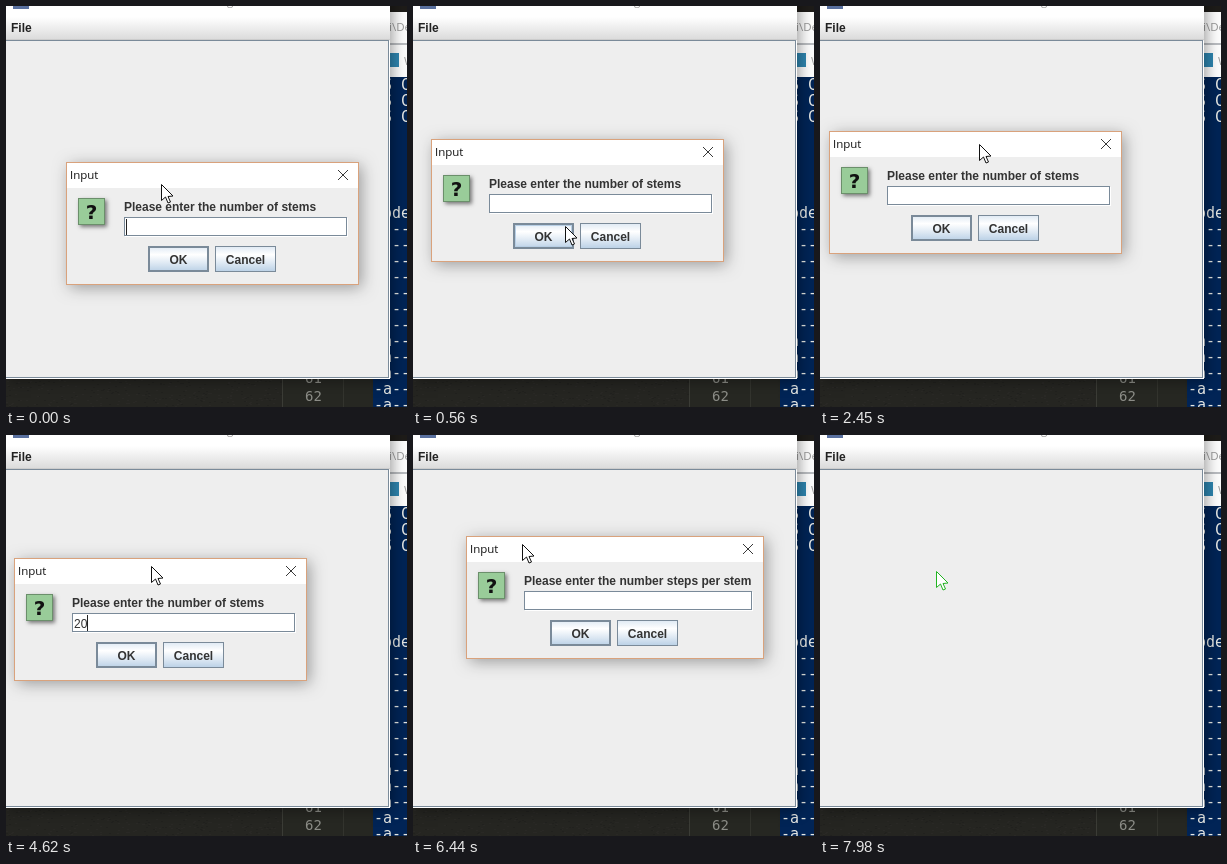
An HTML page with a canvas for the animation above (8 s loop, 401x401 px).

```html
<!DOCTYPE html>
<html lang="en">
<head>
<meta charset="utf-8">
<title>Input dialogs</title>
<style>
html, body { margin: 0; width: 100%; height: 100%; overflow: hidden; background: #eee; }
canvas { display: block; width: 401px; height: 401px; }
</style>
</head>
<body>
<canvas id="stage" width="401" height="401"></canvas>
<script>
const SIZE = 401, LOOP = 8000, STEP = 70, BLINK = 490;
const BOLD = 'bold 12px "Liberation Sans", Arial, sans-serif';
const PLAIN = '12px "Liberation Sans", Arial, sans-serif';
const UI = '11.5px "Open Sans", sans-serif';
const MONO = '15px "DejaVu Sans Mono", monospace';
const EDGE = '#7a8a99';
const screen = document.getElementById('stage').getContext('2d');
let ctx = screen;

const first = {
  opens: 0, closes: 4900, blinkFrom: 0, w: 293, label: 'Please enter the number of stems',
  place: t => glide(glide(glide({ x: 60, y: 156 }, t, 0, 350, 18, 133), t, 2100, 350, 9, 125), t, 2450, 70, 8, 123),
  keys: [[3150, '2'], [3500, '0'], [3990, '<'], [4130, '<'], [4550, '2'], [4620, '0']]
};
const second = {
  opens: 6300, closes: 7980, blinkFrom: 5810, w: 298, label: 'Please enter the number steps per stem',
  place: t => glide(glide({ x: 235, y: 222 }, t, 6300, 140, 53, 101), t, 6440, 70, 42, 91),
  keys: [[7560, '1'], [7770, '0']]
};

// Moves a point to (x, y) during ms from t0 on
function glide(from, t, t0, ms, x, y) {
  const p = Math.min(1, Math.max(0, (t - t0) / ms));
  return { x: Math.round(from.x + (x - from.x) * p), y: Math.round(from.y + (y - from.y) * p) };
}

function grip(d, t, dx, dy) {
  const { x, y } = d.place(t);
  return { x: x + dx, y: y + dy };
}

function pointerAt(t) {
  if (t <= 350) return grip(first, t, 95, 22);
  if (t >= 2100 && t <= 2660) return grip(first, t, 150, 13);
  if (t >= 6300 && t <= 6580) return grip(second, t, 56, 8);
  let p = grip(first, 350, 95, 22);
  const go = (...leg) => { p = glide(p, t, ...leg); };
  go(350, 210, 152, 220);   // to OK
  go(560, 280, 169, 200);   // into the field
  go(1050, 420, 178, 199);
  go(1680, 420, 168, 146);  // back to the title bar
  go(2660, 70, 145, 131);
  go(5250, 70, 145, 126);
  go(5460, 70, 335, 238);
  go(6510, 70, 98, 99);
  go(6580, 490, 124, 140);
  go(7140, 210, 116, 136);
  return p;
}

function fieldAt(d, t) {
  let value = '', since = d.blinkFrom;
  for (const [time, key] of d.keys) {
    if (time > t) break;
    value = key === '<' ? value.slice(0, -1) : value + key;
    since = time;
  }
  return { value, caret: Math.floor((t - since) / BLINK) % 2 === 0 };
}

function rect(x, y, w, h, fill) {
  ctx.fillStyle = fill;
  ctx.fillRect(x, y, w, h);
}

function frame(x, y, w, h, color, width = 1) {
  ctx.strokeStyle = color;
  ctx.lineWidth = width;
  ctx.strokeRect(x + width / 2, y + width / 2, w - width, h - width);
}

function text(s, x, y, font, color, align = 'left') {
  ctx.font = font;
  ctx.fillStyle = color;
  ctx.textAlign = align;
  ctx.fillText(s, x, y);
}

function shade(y, h, ...stops) {
  const g = ctx.createLinearGradient(0, y, 0, y + h);
  stops.forEach((c, i) => g.addColorStop(i / (stops.length - 1), c));
  return g;
}

function shadowed(x, y, w, h, fill, blur, alpha, shift) {
  ctx.save();
  ctx.shadowColor = `rgba(0,0,0,${alpha})`;
  ctx.shadowBlur = blur;
  ctx.shadowOffsetX = ctx.shadowOffsetY = shift;
  rect(x, y, w, h, fill);
  ctx.restore();
}

function wallpaper() {
  rect(0, 0, SIZE, SIZE, '#252521');
  let seed = 7;
  const rnd = n => Math.floor((seed = seed * 16807 % 2147483647) / 2147483647 * n);
  for (let i = 0; i < 300; i++) rect(rnd(276), 374 + rnd(27), 2, 1, rnd(2) ? '#292825' : '#21211e');
}

function editor() {
  rect(276, 366, 91, 35, '#262722');
  rect(276, 366, 1, 35, '#3b3c36');
  rect(337, 366, 1, 35, '#33342e');
  [61, 62].forEach((n, i) => text(n, 299, 377 + i * 18, '14px "DejaVu Sans Mono", monospace', '#8c8d87'));
}

function terminal() {
  rect(367, 0, 34, 6, '#1e1c19');
  rect(367, 6, 34, 65, '#fdfdfd');
  rect(367, 37, 34, 2, '#b9bcc0');
  text('i\\De', 383, 25, UI, '#999');
  rect(381, 47, 12, 14, '#2f86b0');
  text('W', 398, 59, UI, '#999');
  rect(367, 71, 34, 330, '#012456');
  for (let i = 0; i < 21; i++) {
    const line = i < 3 ? 'PS C' : i < 8 ? '' : i === 8 ? 'Mode' : i === 9 ? '----' : i < 16 ? 'd---' : '-a--';
    text(line, 368, 84 + i * 16, MONO, '#e6e8e4');
  }
}

function mainWindow() {
  shadowed(0, -20, 384, 393, '#eee', 14, 0.4, 2);
  rect(0, 0, 384, 11, '#fff');
  rect(7, 0, 16, 3, '#59709f');
  text('g', 221, -1, UI, '#999');
  rect(0, 11, 384, 23, shade(11, 23, '#fff', '#dadada'));
  rect(0, 33, 384, 1, '#ccc');
  frame(-1, 34, 384, 338, EDGE);
  rect(383, 35, 1, 338, '#fff');
  rect(0, 372, 384, 1, '#fff');
  text('File', 5, 26, BOLD, '#222');
}

function makeDesktop() {
  const c = document.createElement('canvas');
  c.width = c.height = SIZE;
  ctx = c.getContext('2d');
  wallpaper();
  editor();
  terminal();
  mainWindow();
  ctx = screen;
  return c;
}

function button(label, x, y, main, hover) {
  rect(x, y, 61, 26, shade(y, 26, '#dde8f3', '#fff', '#dde8f3', '#b8cfe5'));
  if (hover) frame(x + 1, y + 1, 59, 24, '#b8cfe5', 2);
  frame(x, y, 61, 26, EDGE, main ? 2 : 1);
  text(label, x + 30.5, y + 18, BOLD, '#333', 'center');
}

function questionIcon(x, y) {
  shadowed(x, y, 27, 27, '#99cc99', 4, 0.5, 2);
  frame(x, y, 27, 27, '#6b8f6b');
  text('?', x + 13.5, y + 21, 'bold 20px "DejaVu Sans", sans-serif', '#111', 'center');
}

function closeMark(x, y) {
  ctx.strokeStyle = '#222';
  ctx.lineWidth = 0.9;
  ctx.beginPath();
  ctx.moveTo(x, y);
  ctx.lineTo(x + 10, y + 10);
  ctx.moveTo(x + 10, y);
  ctx.lineTo(x, y + 10);
  ctx.stroke();
}

function dialog(d, t, pointer) {
  const { x, y } = d.place(t), w = d.w;
  const { value, caret } = fieldAt(d, t);
  shadowed(x, y, w, 123, '#eee', 15, 0.36, 2.5);
  rect(x, y, w, 26, '#fff');
  frame(x, y, w, 123, '#d9a27c');
  text('Input', x + 4, y + 17, UI, '#111');
  closeMark(x + w - 21, y + 8);
  questionIcon(x + 12, y + 36);
  text(d.label, x + 58, y + 49, BOLD, '#333');

  rect(x + 59, y + 56, w - 70, 19, '#fff');
  frame(x + 58, y + 55, w - 70, 19, EDGE);
  text(value, x + 60, y + 70, PLAIN, '#333');
  if (caret) rect(x + 60 + Math.round(ctx.measureText(value).width), y + 57, 1, 16, '#222');

  const left = x + Math.ceil((w - 128) / 2) - 1;
  const inside = (bx, by, bw, bh) =>
    pointer.x > bx && pointer.x < bx + bw && pointer.y > by && pointer.y < by + bh;
  button('OK', left, y + 84, true, inside(left, y + 84, 61, 26));
  button('Cancel', left + 67, y + 84, false, false);
  return inside(x + 58, y + 55, w - 70, 19);
}

function arrow(x, y, color) {
  ctx.beginPath();
  [[0, 0], [0, 16], [4, 12.5], [6.5, 18.5], [9, 17.5], [6.5, 12], [11.5, 11.5]]
    .forEach(([dx, dy]) => ctx.lineTo(x + 0.5 + dx, y + 0.5 + dy));
  ctx.closePath();
  ctx.fillStyle = '#fff';
  ctx.fill();
  ctx.strokeStyle = color;
  ctx.lineWidth = 1;
  ctx.stroke();
}

function beam(x, y) {
  rect(x, y - 7, 1, 15, '#222');
  for (const end of [-8, 8]) {
    rect(x - 3, y + end, 3, 1, '#222');
    rect(x + 1, y + end, 3, 1, '#222');
  }
}

const desktop = makeDesktop();

function draw(now) {
  const t = Math.floor((now % LOOP) / STEP) * STEP;
  const pointer = pointerAt(t);
  const d = [first, second].find(o => t >= o.opens && t < o.closes);
  ctx.drawImage(desktop, 0, 0);
  const overField = d && dialog(d, t, pointer);
  if (t >= 5600 && t < second.opens) return;
  if (overField) beam(pointer.x, pointer.y);
  else arrow(pointer.x, pointer.y, t >= second.closes ? '#22b422' : '#111');
}

const start = performance.now();
function tick() {
  draw(performance.now() - start);
  requestAnimationFrame(tick);
}
tick();
</script>
</body>
</html>
```
